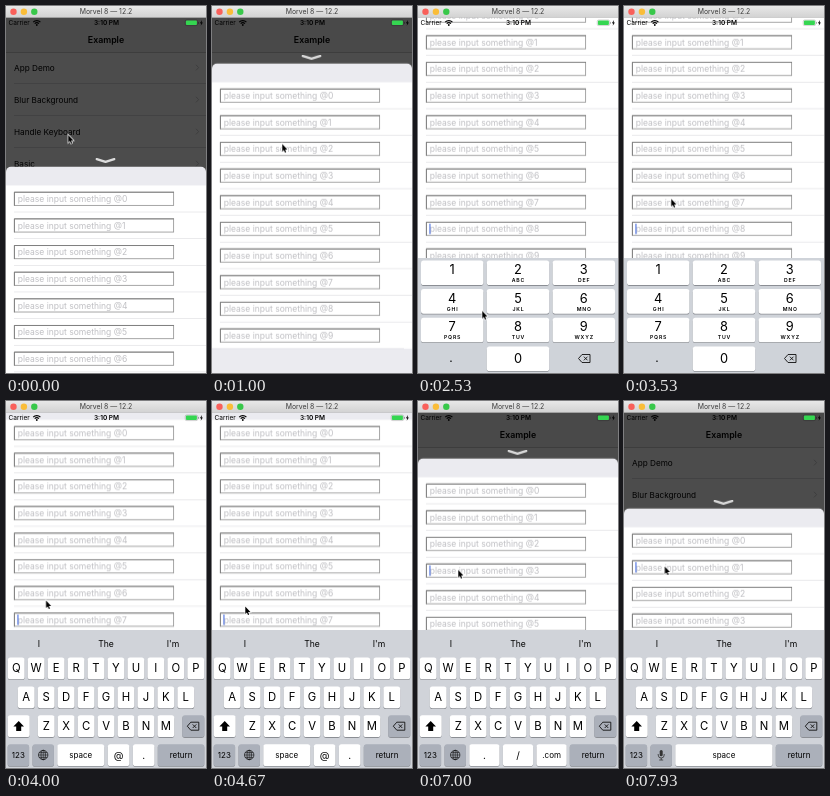
An HTML page that plays this animation: 200x367 px, repeating every 8 s.

```html
<!DOCTYPE html>
<html lang="en">
<head>
<meta charset="utf-8">
<title>Keyboard sheet</title>
<style>
  html, body { margin: 0; width: 100%; height: 100%; overflow: hidden; background: #fff; }
  svg { display: block; width: 100vw; height: 100vh; }
  text { font-family: Inter, Roboto, sans-serif; white-space: pre; }
</style>
</head>
<body>
<script>
const LOOP = 8000;
const svg = add(document.body, 'svg', { viewBox: '0 0 200 367' });

function add(parent, tag, attrs = {}) {
  const el = document.createElementNS('http://www.w3.org/2000/svg', tag);
  for (const k in attrs) el.setAttribute(k, attrs[k]);
  return parent.appendChild(el);
}
const group = (parent, x = 0, y = 0) => add(parent, 'g', { transform: `translate(${x} ${y})` });
const rect = (p, x, y, width, height, fill, more) => add(p, 'rect', { x, y, width, height, fill, ...more });
const line = (p, d, stroke, w = 1, more) =>
  add(p, 'path', { d, stroke, 'stroke-width': w, fill: 'none', ...more });

// y is the middle of the capitals
function label(p, str, x, y, size, more) {
  const el = add(p, 'text', { x, y: y + size * .36, 'font-size': size, ...more });
  el.textContent = str;
  return el;
}
const centred = (p, str, x, y, size, more) => label(p, str, x, y, size, { 'text-anchor': 'middle', ...more });

// steps: [ms, x, y, easing]
function move(el, steps) {
  el.animate(steps.map(([ms, x, y, easing = 'linear']) =>
    ({ offset: ms / LOOP, transform: `translate(${x}px, ${y}px)`, easing })),
    { duration: LOOP, iterations: Infinity });
}
function show(el, from, to) {
  const steps = [[0, 0], [from, 1], [to, 0], [LOOP, 0]];
  el.animate(steps.map(([ms, opacity]) => ({ offset: ms / LOOP, opacity, easing: 'step-end' })),
    { duration: LOOP, iterations: Infinity });
}

// Times at which each field takes the focus
const FOCUS = [
  { row: 8, from: 2065, to: 3600, pad: 'decimal' },
  { row: 7, from: 3600, to: 6070, pad: 'email' },
  { row: 5, from: 6070, to: 7000, pad: 'phone' },
  { row: 3, from: 7000, to: 7925, pad: 'url' },
  { row: 1, from: 7925, to: LOOP, pad: 'ascii' }
];

function drawList() {
  rect(svg, 0, 0, 200, 367, '#fff');
  rect(svg, 0, 11, 200, 35.5, '#f6f6f6');
  rect(svg, 0, 46, 200, .6, '#b2b2b2');
  centred(svg, 'Example', 100, 34, 8.8, { 'font-weight': 600 });
  ['App Demo', 'Blur Background', 'Handle Keyboard', 'Basic'].forEach((name, i) => {
    const y = 61.6 + i * 32;
    label(svg, name, 8, y, 8.2);
    line(svg, `M190 ${y - 2.8}l2.6 2.8l-2.6 2.8`, '#c0c0c4', .8);
    rect(svg, 8, y + 15.8, 192, .6, '#c8c7cc');
  });
  rect(svg, 0, 11, 200, 356, '#000', { opacity: .7 });
}

function drawSheet() {
  const sheet = group(svg);
  line(sheet, 'M90.8 -7.7L99.5 -4.8L108.2 -7.7', '#dcdcdc', 2.4,
    { 'stroke-linecap': 'round', 'stroke-linejoin': 'round' });
  rect(sheet, 0, 0, 200, 480, '#ebebf0', { rx: 5 });
  const pitch = 26.65;
  rect(sheet, 0, 18.7, 200, pitch * 10, '#fff');
  for (let i = 0; i < 10; i++) {
    const row = group(sheet, 0, 32 + i * pitch);
    rect(row, i < 9 ? 8 : 0, 13, 192, .6, '#dcdce0');
    rect(row, 8.4, -6.5, 159.2, 13.2, '#fff', { stroke: '#9c9c9c', 'stroke-width': .9 });
    line(row, 'M8.4 7V-6.5H168', '#7c7c7c', .9);
    label(row, 'please input something @' + i, 11.7, .3, 8.52, { fill: '#bfbfc3' });
    for (const f of FOCUS.filter(f => f.row === i))
      show(rect(row, 11.4, -5, 1.1, 10.4, '#4a6fe0', { opacity: 0 }), f.from, f.to);
  }
  move(sheet, [
    [0, 0, 161.5, 'cubic-bezier(.15,.6,.3,1)'], [530, 0, 57.5],
    [2075, 0, 57.5], [2130, 0, 33.5, 'ease-out'], [2370, 0, -22.5],
    [3600, 0, -22.5, 'ease-in-out'], [3880, 0, 0],
    [6075, 0, 0], [6130, 0, 20.5, 'ease-out'], [6370, 0, 57.5],
    [7000, 0, 57.5, 'ease-in-out'], [7280, 0, 107.5], [LOOP, 0, 107.5]
  ]);
}

function key(p, x, y, w, h, fill = '#fff') {
  rect(p, x, y + .8, w, h, '#8b8e94', { rx: 2.6 });
  rect(p, x, y, w, h, fill, { rx: 2.6 });
}
function backspace(p, x, y) {
  const g = group(p, x, y);
  line(g, 'M-6 0L-2.5 -4H5.5V4H-2.5Z', '#111', .9, { 'stroke-linejoin': 'round' });
  line(g, 'M-.6 -1.8l3.6 3.6m0 -3.6l-3.6 3.6', '#111', .9);
}
function globe(p, x, y) {
  const g = group(p, x, y);
  const ring = { fill: 'none', stroke: '#111', 'stroke-width': .7 };
  add(g, 'circle', { r: 4.7, ...ring });
  add(g, 'ellipse', { rx: 2.2, ry: 4.7, ...ring });
  line(g, 'M-4.7 0H4.7M0 -4.7V4.7M-4 -2.4H4M-4 2.4H4', '#111', .6);
}
function mic(p, x, y) {
  const g = group(p, x, y);
  rect(g, -1.5, -5, 3, 6.2, '#333', { rx: 1.5 });
  line(g, 'M-3 -1V0A3 3 0 0 0 3 0V-1M0 3V5M-2 5H2', '#333', .8);
}

// plus, star and hash drawn as thin strokes
function symbols(p, x, y) {
  const g = group(p, x, y);
  line(g, 'M-13.5 0h7M-10 -3.5v7', '#111', .8);
  line(g, 'M0 -3.2v6.4M-2.8 -1.6l5.6 3.2M-2.8 1.6l5.6 -3.2', '#111', .8);
  line(g, 'M9.2 -3.8l-1.2 7.6M12.6 -3.8l-1.2 7.6M7.2 -1.4h6.8M6.6 1.4h6.8', '#111', .8);
}

function numberPad(p, kind) {
  rect(p, 0, 252, 200, 115, '#cfd3d9');
  const letters = ['', 'ABC', 'DEF', 'GHI', 'JKL', 'MNO', 'PQRS', 'TUV', 'WXYZ'];
  letters.forEach((str, i) => {
    const x = 3 + (i % 3) * 65.8, y = 254.5 + Math.floor(i / 3) * 28.6;
    key(p, x, y, 62.4, 24.6);
    centred(p, i + 1, x + 31.2, y + 9, 12.8);
    centred(p, str, x + 31.6, y + 19.7, 5.2, { 'font-weight': 600, 'letter-spacing': .8 });
  });
  key(p, 68.8, 340.4, 62.4, 24.6);
  centred(p, 0, 100, 352.7, 12.8);
  if (kind === 'decimal') centred(p, '.', 33, 352, 12);
  else symbols(p, 33.5, 352);
  backspace(p, 166.5, 352.5);
}

function letterPad(p, kind) {
  const gray = '#abb0ba';
  rect(p, 0, 229, 200, 138, '#d0d3d9');
  ['I', 'The', "I'm"].forEach((word, i) => centred(p, word, 33 + i * 67, 243, 8.6));
  [['QWERTYUIOP', 10.2], ['ASDFGHJKL', 20.2], ['ZXCVBNM', 40.2]].forEach(([row, x0], r) => {
    [...row].forEach((ch, i) => {
      const x = x0 + i * 19.95, y = 256.5 + r * 28.9;
      key(p, x - 8.4, y, 16.8, 21.8);
      centred(p, ch, x, y + 10.9, 11.3);
    });
  });
  key(p, 1.7, 314.3, 22, 21.8);
  add(p, 'path', { d: 'M12.7 320L18 325.6H15.2V330H10.2V325.6H7.4Z' });
  key(p, 176.3, 314.3, 22, 21.8, gray);
  backspace(p, 187.3, 325.2);

  const y = 343.2;
  const cap = (x, w, str, fill, size = 8) => {
    key(p, x, y, w, 21.8, fill);
    centred(p, str, x + w / 2, y + 10.9, size);
  };
  cap(1.7, 21.4, '123', gray);
  cap(26.5, 21.4, '', gray);
  (kind === 'ascii' ? mic : globe)(p, 37.2, 354);
  if (kind === 'email') {
    cap(51.3, 47, 'space');
    cap(101.8, 21.6, '@', '#fff', 10);
    cap(126.9, 21.6, '.', '#fff', 10);
  } else if (kind === 'url') {
    cap(51.3, 30.2, '.', '#fff', 10);
    cap(84.9, 30.2, '/', '#fff', 10);
    cap(118.5, 30.2, '.com');
  } else cap(51.3, 97.2, 'space');
  cap(151.8, 46.5, 'return', gray);
}

function drawKeyboards() {
  const board = group(svg);
  for (const f of FOCUS) {
    const pad = add(board, 'g', { opacity: 0 });
    const draw = ['decimal', 'phone'].includes(f.pad) ? numberPad : letterPad;
    draw(pad, f.pad);
    show(pad, f.from, f.to);
  }
  move(board, [[0, 0, 116], [2135, 0, 116, 'ease-out'], [2420, 0, 0], [LOOP, 0, 0]]);
}

function drawBars() {
  label(svg, 'Carrier', 2.5, 17, 6.5);
  const wifi = group(svg, 30.8, 19.4);
  line(wifi, 'M-3.6 -3.3A5 5 0 0 1 3.6 -3.3M-2.1 -1.8A3 3 0 0 1 2.1 -1.8', '#000', 1.2);
  add(wifi, 'circle', { cy: -.4, r: .9 });
  centred(svg, '3:10 PM', 100.5, 17, 6.5, { 'font-weight': 600 });
  rect(svg, 179.2, 14, 12.4, 5.6, 'none', { rx: 1.4, stroke: '#000', 'stroke-opacity': .35, 'stroke-width': .5 });
  rect(svg, 179.9, 14.6, 11, 4.4, '#35d651', { rx: .9 });
  rect(svg, 192.1, 15.9, .8, 1.9, '#000', { opacity: .4 });
  add(svg, 'path', { d: 'M196 14L193.9 17.2H195.2L194.7 19.8L196.9 16.4H195.6Z' });

  const shade = add(svg, 'linearGradient', { id: 'bar', x2: 0, y2: 1 });
  add(shade, 'stop', { offset: 0, 'stop-color': '#e8e8e8' });
  add(shade, 'stop', { offset: 1, 'stop-color': '#d2d2d2' });
  rect(svg, 0, 0, 200, 11.5, 'url(#bar)');
  rect(svg, 0, 11, 200, .5, '#b4b4b4');
  ['#f9605a', '#fabd38', '#38c84a'].forEach((fill, i) =>
    add(svg, 'circle', { cx: 7.5 + i * 10.4, cy: 5.8, r: 3.2, fill }));
  centred(svg, 'Morvel 8 — 12.2', 100, 6, 6.9, { fill: '#3c3c3c' });
}

function drawCursor() {
  const cursor = group(svg);
  add(cursor, 'path', {
    d: 'M.3 .5V7.9L1.9 6.4L3 9L4.2 8.5L3.1 5.9H5.4Z',
    stroke: '#fff', 'stroke-width': 1.3, 'paint-order': 'stroke'
  });
  const ease = 'ease-in-out';
  move(cursor, [
    [0, 62, 128.5], [870, 62, 128.5], [1000, 70, 137.5, ease],
    [1900, 64, 304.5], [2600, 64, 304.5, ease], [3450, 47, 192.5],
    [3720, 47, 192.5, ease], [4270, 33, 205], [4670, 33, 205, ease],
    [5700, 40, 168.5], [7300, 40, 168.5, ease], [7850, 40.5, 165], [LOOP, 40.5, 165]
  ]);
}

drawList();
drawSheet();
drawKeyboards();
drawBars();
drawCursor();
</script>
</body>
</html>
```
